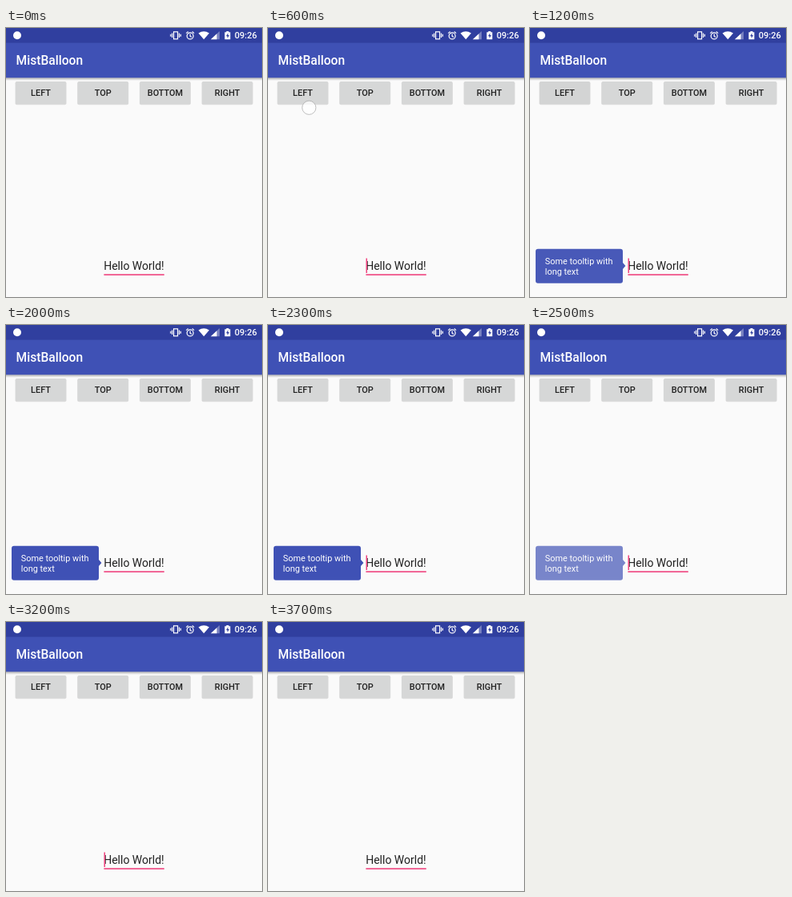
An HTML page that plays this animation: 320x337 px, repeating every 4100 ms.

```html
<!DOCTYPE html>
<html lang="en">
<head>
<meta charset="utf-8">
<title>Tooltip demo</title>
<style>
  html, body { margin: 0; height: 100%; overflow: hidden; background: #fafafa; }
  svg { display: block; width: 100%; height: 100%; font-family: Roboto, sans-serif; }
  .button { font-size: 10.9px; font-weight: 500; text-anchor: middle; fill: #202020; }
</style>
</head>
<body>
<svg viewBox="0 0 320 337">
  <defs>
    <linearGradient id="shade" x2="0" y2="1">
      <stop stop-color="#000" stop-opacity=".3"/>
      <stop offset="1" stop-color="#000" stop-opacity="0"/>
    </linearGradient>
  </defs>

  <rect y="62" width="320" height="4" fill="url(#shade)"/>
  <rect width="320" height="62.3" fill="#3f51b5"/>
  <rect width="320" height="18.6" fill="#303f9f"/>
  <text x="12.5" y="46.3" font-size="15.6" font-weight="500" fill="#fff">MistBalloon</text>

  <g fill="#fff">
    <circle cx="14" cy="9.3" r="5"/>
    <g fill="none" stroke="#fff" stroke-width="1.2">
      <rect x="209.6" y="4.8" width="5" height="9"/>
      <path d="M207.7 6.5v5.6M205.8 7.8v3M216.5 6.5v5.6M218.4 7.8v3"/>
      <circle cx="230.2" cy="9.9" r="4"/>
      <path d="M230.2 7.4v2.8l1.9 1.2M225.2 6.6l2.5-2.1M235.2 6.6l-2.5-2.1"/>
    </g>
    <path d="M240.6 6.6q6.7-4.6 13.4 0L247.3 14.3z"/>
    <path d="M256 14.3h11V4z" opacity=".35"/>
    <path d="M256 14.3h7.5V7.3z"/>
    <path d="M273.4 5.2h2V4h3v1.2h2v9.1h-7z"/>
    <path d="M277.5 6.2l-2.4 4h1.6v2.9l2.4-4.1h-1.6z" fill="#303f9f"/>
    <text x="285.8" y="13.4" font-size="11" font-weight="500">09:26</text>
  </g>

  <g id="buttons"></g>
  <rect id="press" x="12" y="67" width="63" height="28.3" rx="1.6"/>
  <circle id="touch" cx="51.3" cy="99.8" r="8.6" fill="#fff" fill-opacity=".75" stroke="#aaa" stroke-opacity=".75"/>

  <text x="122.2" y="303" font-size="14" fill="#212121">Hello World!</text>
  <rect x="122.4" y="308.3" width="75.4" height="1.6" fill="#f0437f"/>
  <rect id="caret" x="122.5" y="288.5" width="1.5" height="18.5" fill="#f0437f"/>

  <g id="tip">
    <path d="M10 276.8h103q3 0 3 3V294l3.4 4l-3.4 4v14.7q0 3-3 3H10q-3 0-3-3V279.8q0-3 3-3z" fill="#3f51b5"/>
    <g font-size="10.9" fill="#fff">
      <text x="18.8" y="296.2">Some tooltip with</text>
      <text x="18.8" y="309">long text</text>
    </g>
  </g>
</svg>
<script>
  const LOOP = 4100, FADE = 480;
  const $ = id => document.getElementById(id);
  const show = (id, alpha) => $(id).setAttribute('opacity', alpha);
  const clamp = v => Math.min(1, Math.max(0, v));
  const ease = v => (1 - Math.cos(Math.PI * clamp(v))) / 2;

  $('buttons').innerHTML = ['LEFT', 'TOP', 'BOTTOM', 'RIGHT'].map((label, i) => {
    const x = 12 + i * 77.7;
    return `<rect x="${x - .5}" y="67.3" width="64" height="29" rx="2" opacity=".13"/>
      <rect x="${x}" y="67" width="63" height="28.3" rx="1.6" fill="#d6d7d7"/>
      <text class="button" x="${x + 31.5}" y="85.1">${label}</text>`;
  }).join('');

  function draw(now) {
    const t = now % LOOP, blink = t % 1000;
    show('tip', ease((t - 790) / FADE) - ease((t - 2320) / FADE));
    show('caret', +(t < 3900 && blink >= 200 && blink < 650));
    show('touch', +(t >= 600 && t < 800));
    show('press', .09 * clamp((t - 600) / 150) * clamp((1250 - t) / 350));
    requestAnimationFrame(draw);
  }
  draw(0);
</script>
</body>
</html>
```
